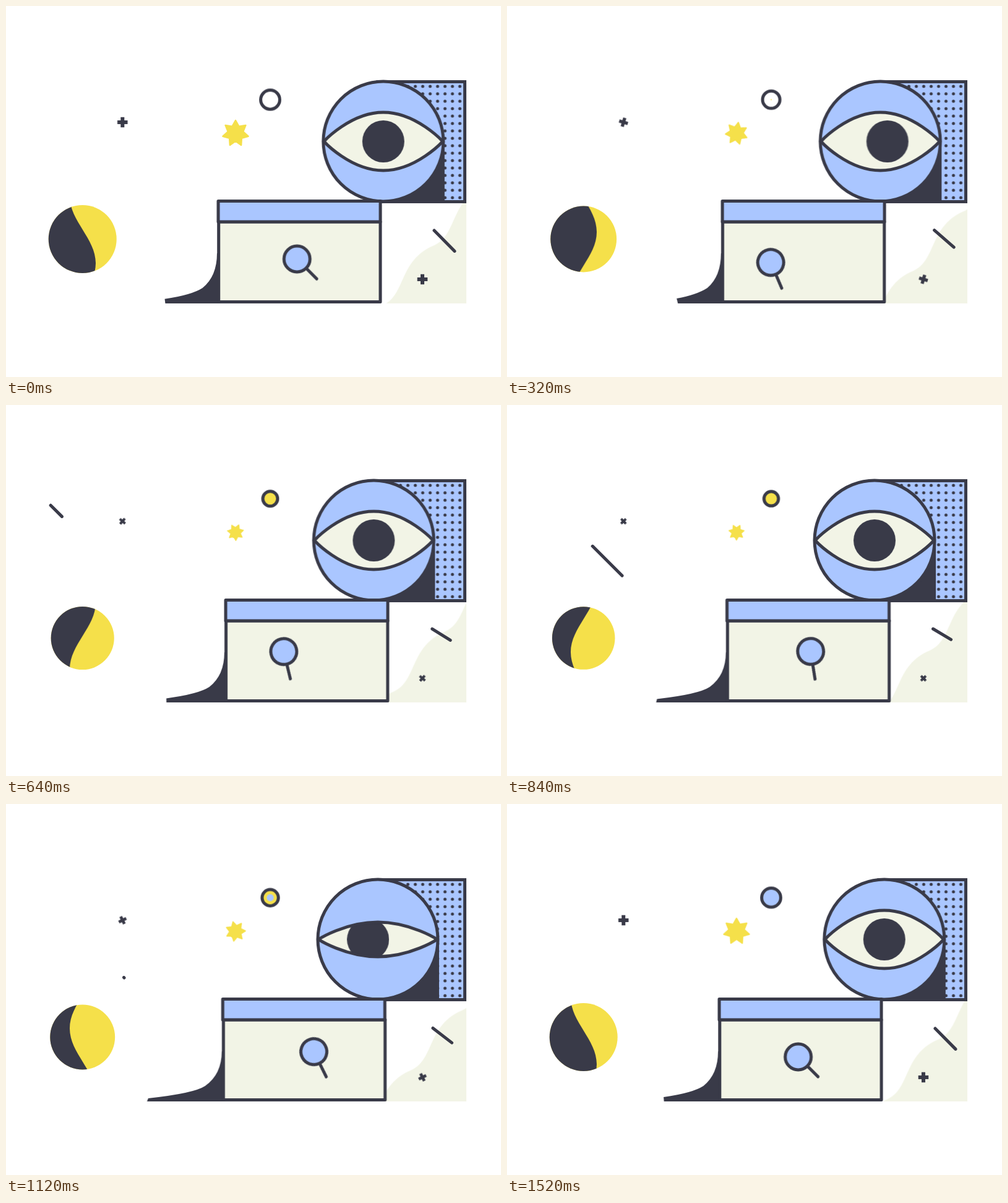
Recreate the animation shown at these times as an HTML page without scripts. Size 800 px wide and 600 px high, loop 1.56 s.

```html
<!DOCTYPE html>
<html lang="en">
<head>
<meta charset="utf-8">
<title>Search and discovery</title>
<style>
  html, body { margin: 0; width: 100%; height: 100%; overflow: hidden; background: #fff; }
  svg { display: block; width: 100vw; height: 100vh; }

  :root { --dark: #393a48; --blue: #aac6ff; --cream: #f2f4e6; --yellow: #f5e04a; }
  .dark { fill: var(--dark); }
  .blue { fill: var(--blue); }
  .cream { fill: var(--cream); }
  .yellow { fill: var(--yellow); }
  .none { fill: none; }
  .line { stroke: var(--dark); stroke-width: 5; stroke-linecap: round; }
  .round { stroke-linejoin: round; }
  .fixed { vector-effect: non-scaling-stroke; }

  /* Every part shares one loop and one sway easing */
  .move { animation: 1560ms cubic-bezier(.333, 0, .667, 1) infinite; }

  /* Eye */
  .eye { animation-name: eye; }
  @keyframes eye { 48% { transform: translateX(-16.4px); } 98.7% { transform: none; } }
  .pupil { animation-name: pupil; }
  @keyframes pupil {
    20.5% { transform: translateX(11.5px); }
    41%, 53.5%, 97.4% { transform: none; }
    71.8% { transform: translateX(-15.8px); }
  }
  .lids { animation-name: blink; }
  @keyframes blink {
    0%, 25.6%, 35.9%, 66.7%, 76.9%, 100% { transform: none; }
    30.8%, 71.8% { transform: scaleY(.595); }
  }

  /* Window */
  .box { animation-name: box; }
  .header { animation-delay: -15ms; }
  @keyframes box { 50% { transform: translateX(12.9px); } }
  .foot { animation-name: foot; animation-delay: -1290ms; }
  @keyframes foot {
    0%, 100% { d: path("M270 473Q302 467 319 456Q341 437 341 400H346V481H272Z"); }
    50% { d: path("M221 476Q296 468 314 456Q341 437 341 400H346V481H219Z"); }
  }
  .lens { animation-name: lens; animation-timing-function: linear; }
  @keyframes lens {
    10.3% { transform: translate(-31.5px, 21.5px); }
    30.8% { transform: translate(-66.5px, -10px); }
    53.8% { transform: translate(7.5px, -10.5px); }
    71.8% { transform: translate(19.5px, -8.5px); }
    82% { transform: none; }
  }
  .tilt { animation-name: tilt; animation-timing-function: cubic-bezier(.1, .5, .6, .8); }
  @keyframes tilt {
    53.8% { transform: rotate(36deg); animation-timing-function: ease-in; }
    82% { transform: none; }
  }

  /* Travelling waves move by exactly one wavelength per cycle */
  .hill { animation-name: hill; animation-duration: 780ms; animation-timing-function: cubic-bezier(.3, .42, .7, .58); }
  @keyframes hill { to { transform: translate(-83px, 97px); } }
  .shade { animation-name: shade; animation-timing-function: cubic-bezier(.3, .36, .66, .7); }
  @keyframes shade { to { transform: translateY(-216px); } }
  .moon { animation-name: moon; }
  @keyframes moon { 50% { r: 50.7px; } }

  /* Small ornaments */
  .plus { animation-name: plus; }
  @keyframes plus { 50% { transform: rotate(45deg) scale(.66); } to { transform: rotate(90deg); } }
  .star { animation-name: star; }
  @keyframes star { 50% { transform: rotate(25.7deg) scale(.59); } to { transform: rotate(51.43deg); } }
  .ring { animation-name: ring; }
  @keyframes ring { 50% { transform: scale(.755); } }
  .grow { animation-name: grow; }
  .late { animation-name: grow-late; }
  @keyframes grow { 0%, 17.95% { r: 0; } 33.3%, 100% { r: 13.2px; } }
  @keyframes grow-late { 0%, 64.1% { r: 0; } 79.5%, 100% { r: 13.2px; } }
  .dash { animation-name: dash; }
  @keyframes dash {
    0%, 100% { d: path("M692 363L725 396.5"); }
    50% { d: path("M688.5 362L717.5 379"); }
  }
  .comet { animation: comet 1560ms linear infinite, show 1560ms step-end infinite; }
  @keyframes comet {
    0%, 33.3% { d: path("M32 122L32 122"); }
    53.85% { d: path("M138 228L186 276"); animation-timing-function: ease-out; }
    71.8%, 100% { d: path("M190.5 280.5L191 281"); }
  }
  @keyframes show { 0% { opacity: 0; } 33.4% { opacity: 1; } 73% { opacity: 0; } }
</style>
</head>
<body>
<svg viewBox="0 0 800 600">
  <defs>
    <pattern id="dots" x="655.5" y="124" width="12" height="12" patternUnits="userSpaceOnUse">
      <circle class="dark" cx="6" cy="6" r="2.5"/>
    </pattern>
    <path id="cross" d="M-3-8.3H3V-3H8.3V3H3V8.3H-3V3H-8.3V-3H-3Z"/>
    <path id="almond" class="fixed" d="M-96 0S-53-47 0-47S96 0 96 0S53 47 0 47S-96 0-96 0Z"/>
    <clipPath id="land"><path d="M600 317H744V481H600Z"/></clipPath>
    <clipPath id="disc"><circle class="move moon" cx="123.7" cy="377" r="55"/></clipPath>
    <clipPath id="opening"><use href="#almond" class="move lids"/></clipPath>
  </defs>

  <!-- Moon -->
  <g clip-path="url(#disc)">
    <path class="yellow" d="M60 310H190V440H60Z"/>
    <path class="dark move shade" d="M103 308c0 40 42 68 42 108s-42 68-42 108s42 68 42 108s-42 68-42 108H60V308Z"/>
  </g>

  <!-- Hill -->
  <g clip-path="url(#land)">
    <path class="cream move hill" d="M858 193c-58 24-45 80-83 97c-58 24-45 80-83 97c-58 24-45 80-83 97c-58 24-45 80-83 97H858Z"/>
  </g>

  <!-- Ornaments -->
  <path class="none line move dash" d="M692 363L725 396.5"/>
  <path class="none line comet" d="M32 122L32 122"/>
  <g transform="translate(188.3 188)"><use href="#cross" class="dark move plus"/></g>
  <g transform="translate(673 442)"><use href="#cross" class="dark move plus"/></g>
  <g transform="translate(371 206)">
    <path class="yellow round move star" stroke="#f5e04a" stroke-width="2.5"
      d="M0-21L5.4-11.3L16.4-13.1L12.2-2.8L20.5 4.7L9.8 7.8L9.1 18.9L0 12.5L-9.1 18.9L-9.8 7.8L-20.5 4.7L-12.2-2.8L-16.4-13.1L-5.4-11.3Z"/>
  </g>
  <g transform="translate(427 151.5)">
    <g class="move ring">
      <circle class="yellow move grow" r="0"/>
      <circle class="blue move late" r="0"/>
      <circle class="none line fixed" r="15.4"/>
    </g>
  </g>

  <!-- Eye -->
  <path class="blue" d="M600 122.5H741.5V316.5H600Z"/>
  <path fill="url(#dots)" d="M600 124H739.5V316H600Z"/>
  <path class="none line" d="M600 122.5H741.5V316.5H600"/>
  <g transform="translate(609.8 219)">
    <g class="move eye">
      <path class="dark" d="M0 0H99V98H0Z"/>
      <circle class="blue line" r="97"/>
      <use href="#almond" class="cream move lids"/>
      <g clip-path="url(#opening)"><circle class="dark move pupil" r="34"/></g>
      <use href="#almond" class="none line round move lids"/>
    </g>
  </g>

  <!-- Window -->
  <g class="move box">
    <path class="dark move foot" d="M257 474Q302 467 319 456Q341 437 341 400H346V481H261Z"/>
    <path class="cream line round" d="M343.7 349H605V478.5H343.7Z"/>
  </g>
  <path class="blue line round move box header" d="M343 315.5H605V349H343Z"/>
  <g class="move box">
    <g transform="translate(470.5 409)">
      <g class="move lens">
        <g class="move tilt">
          <path class="line" d="M15 15L32 32"/>
          <circle class="blue line" r="21"/>
        </g>
      </g>
    </g>
  </g>
</svg>
</body>
</html>
```
